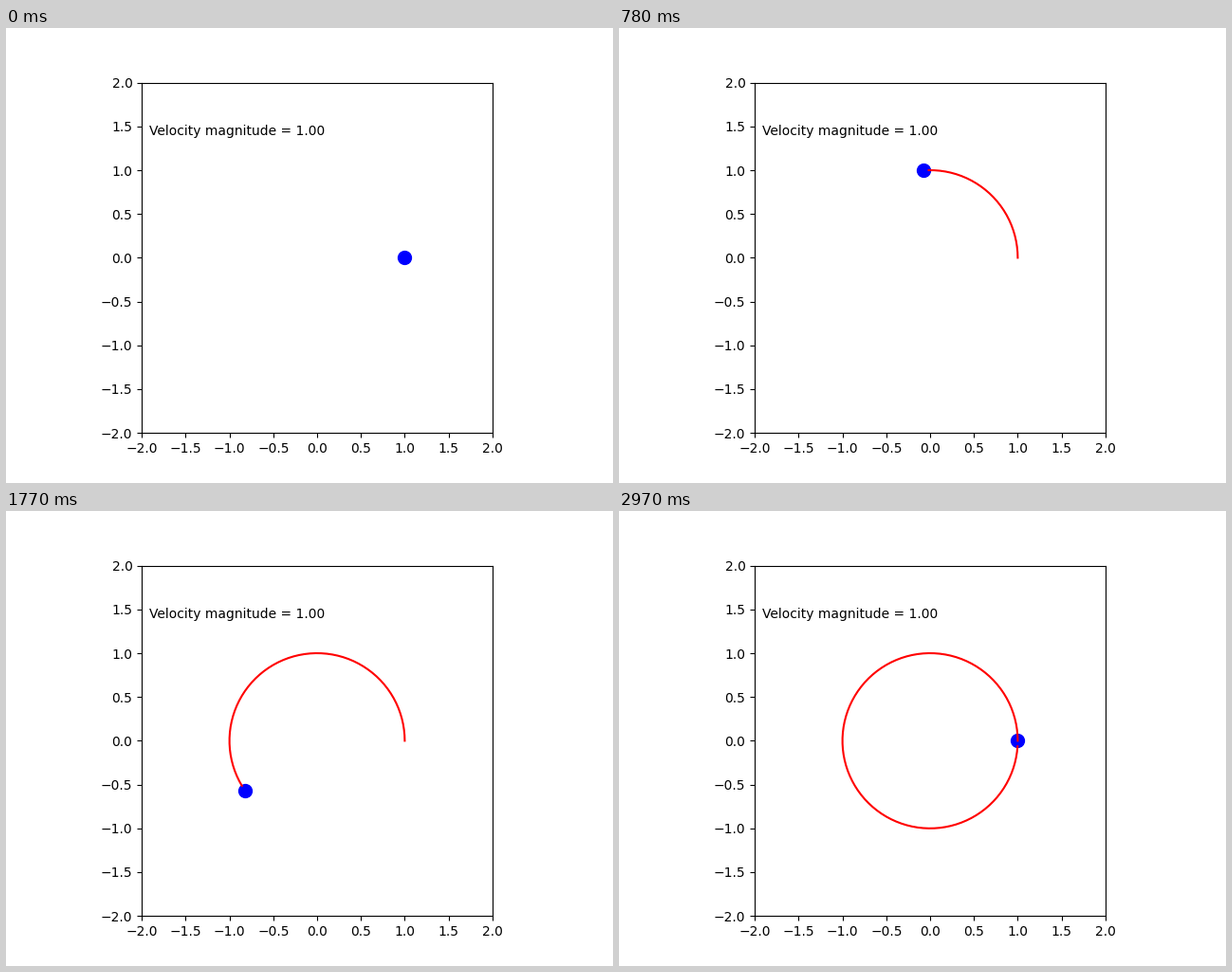
A matplotlib script that plays this animation: 640 px wide and 480 px high, repeating every 3000 ms.

```python
import numpy as np
import matplotlib.pyplot as plt
from matplotlib.animation import FuncAnimation

FRAMES = 100
INTERVAL = 30

theta = np.linspace(0, 2 * np.pi, FRAMES)
x, y = np.cos(theta), np.sin(theta)
speed = np.hypot(-np.sin(theta), np.cos(theta))

fig, ax = plt.subplots(figsize=(6.4, 4.8), dpi=100)
ax.set_aspect("equal")
ax.set_xlim(-2, 2)
ax.set_ylim(-2, 2)
ticks = np.arange(-2, 2.1, 0.5)
ax.set_xticks(ticks)
ax.set_yticks(ticks)

ball, = ax.plot([], [], "bo", markersize=10)
trail, = ax.plot([], [], "r-")
label = ax.text(0.02, 0.85, "", transform=ax.transAxes)


def update(i):
    ball.set_data([x[i]], [y[i]])
    trail.set_data(x[:i], y[:i])
    label.set_text(f"Velocity magnitude = {speed[i]:.2f}")
    return ball, trail, label


anim = FuncAnimation(fig, update, frames=FRAMES, interval=INTERVAL,
                     init_func=lambda: update(0), repeat=True, repeat_delay=0)
plt.show()
```
